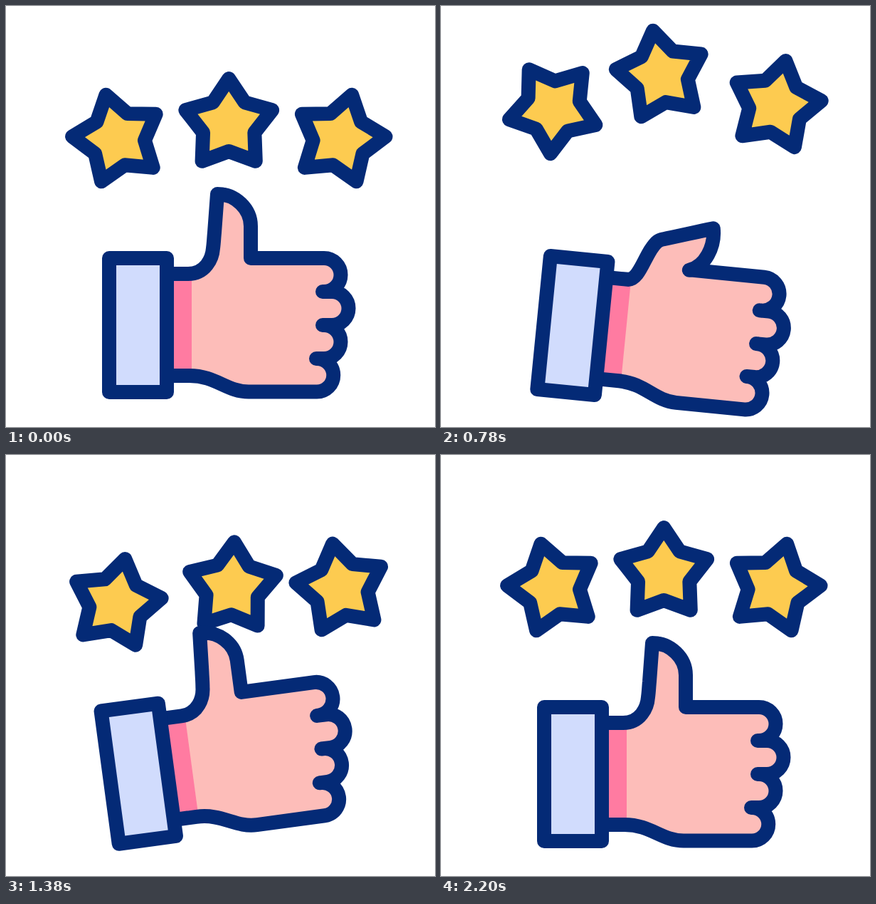
An HTML page for the animation above (2220 ms loop, 603 px wide and 591 px high).

```html
<!DOCTYPE html>
<html lang="en">
<head>
<meta charset="utf-8">
<title>Thumbs up with three stars</title>
<style>
  html, body { margin: 0; width: 100%; height: 100%; overflow: hidden; background: #fff; }
  svg { display: block; width: 603px; height: 591px; }
  .line { stroke: #042a76; stroke-width: 20; stroke-linejoin: round; stroke-linecap: round; }
</style>
</head>
<body>
<svg viewBox="0 0 603 591">
  <g id="stars"></g>
  <g id="hand">
    <path id="skin" fill="#fdbdb9"/>
    <path d="M226 376H261V519H226Z" fill="#ff7ba1"/>
    <path id="outline" class="line" fill="none"/>
    <path class="line" fill="#d1dcfd" d="M145 354H226V542H145Z"/>
  </g>
</svg>
<script>
const LOOP = 2220;
const STEP = 600;
const SWING = 9.7;
const $ = id => document.getElementById(id);

// Each star goes from rest to high, to low and back: [x, y, turn]
const STARS = [
  { delay: 0, rest: [157, 186.6, -15], high: [1.8, -62, 314], low: [-2.4, 28, -240] },
  { delay: 200, rest: [313.2, 166, 0], high: [-4, -68.5, 62], low: [5, 20.5, -503] },
  { delay: 395, rest: [469.6, 186.6, 15], high: [2, -65.5, 297], low: [1, 27, -253] }
];

// Thumb curves from the wrist to the first knuckle
const UPRIGHT = [280, 376, 290, 355, 291, 340, 292, 333, 292.3, 325, 293, 318,
  294.3, 300, 295.7, 282, 297, 264, 323, 264, 344, 285, 344, 309];
const FOLDED = [270, 376, 275, 350, 284, 332, 289, 323, 292, 317, 300, 315,
  320, 309, 346, 300, 369, 293, 374, 318, 363, 347, 341, 354.5];
const FINGERS = 'L344 354H447A23 23 0 0 1 447 401H445H458A23.5 23.5 0 0 1 458 448' +
  'H445H447A23.5 23.5 0 0 1 447 495H436H437A23 23 0 0 1 437 541.5' +
  'H341C310 541.5 295 519 258 519H226';

// Eased 0 to 1 between two times
function ramp(t, from, to) {
  const u = Math.min(1, Math.max(0, (t - from) / (to - from)));
  return (1 - Math.cos(Math.PI * u)) / 2;
}

// Eased 0 to high to low to 0, one step each
function wave(t, high, low) {
  return high * ramp(t, 0, STEP) +
    (low - high) * ramp(t, STEP, 2 * STEP) -
    low * ramp(t, 2 * STEP, 3 * STEP);
}

function starPath() {
  const points = Array.from({ length: 10 }, (_, i) => {
    const r = i % 2 ? 38 : 64, a = i * Math.PI / 5;
    return `${(r * Math.sin(a)).toFixed(2)} ${(-r * Math.cos(a)).toFixed(2)}`;
  });
  return `M${points.join('L')}Z`;
}

for (const star of STARS) {
  star.el = document.createElementNS('http://www.w3.org/2000/svg', 'path');
  star.el.setAttribute('class', 'line');
  star.el.setAttribute('fill', '#fdcb50');
  star.el.setAttribute('d', starPath());
  $('stars').append(star.el);
}

function draw(t) {
  for (const { el, delay, rest, high, low } of STARS) {
    const [x, y, turn] = rest.map((v, i) => v + wave(t - delay, high[i], low[i]));
    el.setAttribute('transform', `translate(${x} ${y}) rotate(${turn})`);
  }
  const fold = ramp(t, 0, 300) - ramp(t, 920, 1190);
  const thumb = UPRIGHT.map((v, i) => v + (FOLDED[i] - v) * fold);
  const d = `M226 376H256C${thumb.join(' ')}${FINGERS}`;
  $('skin').setAttribute('d', d);
  $('outline').setAttribute('d', d);
  $('hand').setAttribute('transform', `rotate(${wave(t, SWING, -SWING)} 180 442)`);
}

const start = performance.now();
function tick() {
  draw((performance.now() - start) % LOOP);
  requestAnimationFrame(tick);
}
draw(0);
requestAnimationFrame(tick);
</script>
</body>
</html>
```
